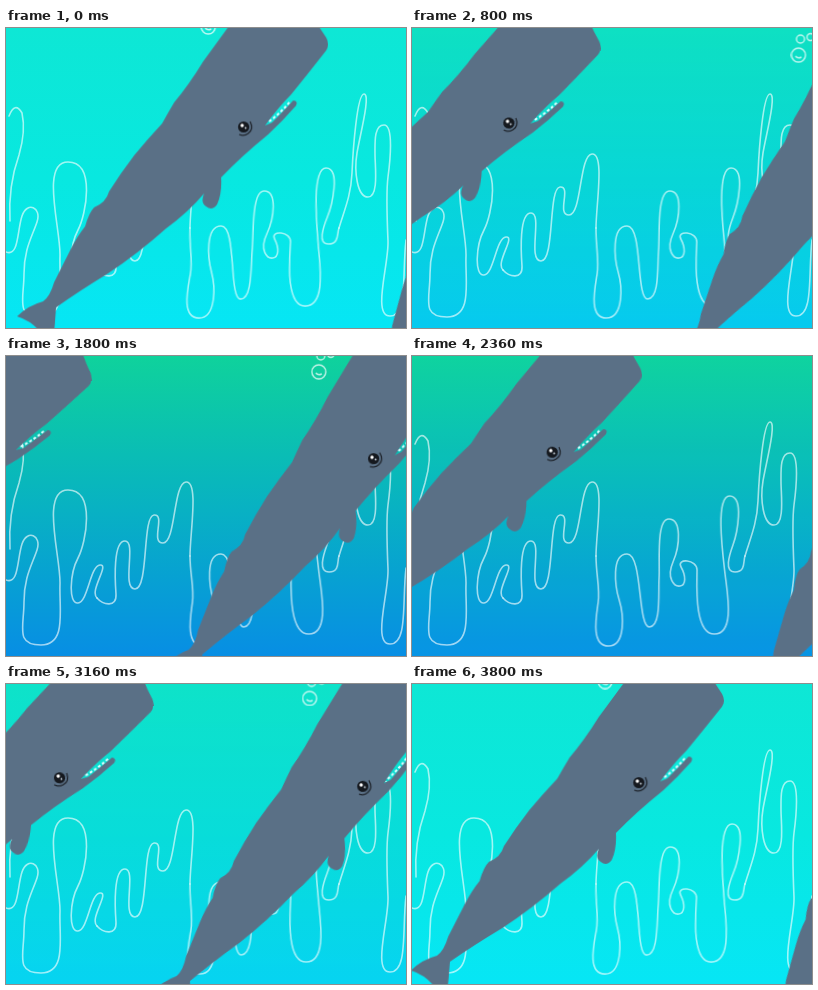
These frames come from a looping animation (400 by 300 pixels, 3840 ms). An HTML page without scripts:

```html
<!DOCTYPE html>
<html lang="en">
<head>
<meta charset="utf-8">
<title>Whales</title>
<style>
  html, body { margin: 0; width: 100%; height: 100%; overflow: hidden; }
  svg { display: block; width: 100vw; height: 100vh; }

  .dusk { animation: dusk 1920ms cubic-bezier(.58, 0, .42, 1) infinite alternate; }
  .weed { fill: none; stroke: #fff; stroke-opacity: .62; stroke-width: 1.6; stroke-linecap: round; stroke-linejoin: round; }
  .sway { transform-origin: 184px 200px; animation: sway 1920ms ease-in-out infinite alternate; }

  .whale { animation: swim 3840ms steps(96) var(--lead) infinite; }
  .bubbles { fill: none; stroke: #fff; stroke-opacity: .75; stroke-width: 1.4; animation: drift 3840ms steps(96) var(--lead) infinite; }
  .first { --lead: -2360ms; }
  .second { --lead: -1040ms; }
  .third { --lead: -3480ms; }

  @keyframes dusk { from { opacity: 0; } to { opacity: 1; } }
  @keyframes sway { from { transform: skewX(-2deg); } to { transform: skewX(.6deg); } }
  /* The eye is the pivot: it moves evenly while the body tilts upward. */
  @keyframes swim {
    from { transform: translate(-401px, 81.6px) rotate(24.3deg); }
    to { transform: translate(639px, 110.7px) rotate(-15.2deg); }
  }
  @keyframes drift {
    from { transform: translate(-341px, -84px); }
    to { transform: translate(543px, 51px); }
  }
</style>
</head>
<body>
<svg viewBox="0 0 400 300" preserveAspectRatio="none">
  <defs>
    <linearGradient id="day" x2="0" y2="1">
      <stop stop-color="#0ee7d5"/>
      <stop offset=".5" stop-color="#08e8e0"/>
      <stop offset="1" stop-color="#06e6f5"/>
    </linearGradient>
    <linearGradient id="night" x2="0" y2="1">
      <stop stop-color="#10d29c"/>
      <stop offset=".5" stop-color="#08b2c2"/>
      <stop offset="1" stop-color="#088ee4"/>
    </linearGradient>

    <g id="whale" transform="translate(-238 -99)">
      <path fill="#5a7086" d="M221 0 L197 33 Q183 56 168 74 Q162 84 156 95 Q142 110 128 127
        Q115 144 103 163 Q100 174 88 179 Q83 184 79 198 Q71 208 64 222 Q57 236 48 254 Q44 268 37 273
        Q22 277 11 288 Q24 292 33 302 Q40 312 47 313 Q49 296 50 279
        Q74 262 102 245 Q132 225 160 200 Q182 184 198 165 Q194 174 200 178 Q206 183 211 176 Q216 165 215 149
        Q235 128 262 106 Q277 92 290 77 Q292 72 287 72 Q276 84 266 94 L259 97
        Q272 79 285 66 Q302 45 320 22 Q324 16 320 9 L314 0 Q303 -22 285 -32 Q255 -42 236 -20 Z"/>
      <path fill="none" stroke="#dffcff" stroke-width="2" stroke-dasharray="2.8 2.2" d="M263 93 Q275 84 284 73"/>
      <circle cx="237.5" cy="98.5" r="5.6" fill="#15191f"/>
      <path fill="none" stroke="#20262e" stroke-width="1.3" d="M244 93 Q248 101 242 105 Q238 108 233 106"/>
      <circle cx="236" cy="97" r="1.7" fill="#fff"/>
      <circle cx="239.5" cy="99.5" r=".9" fill="#cfd8e0"/>
    </g>

    <g id="bubbles">
      <circle r="7"/>
      <path d="M-3 1 Q-1 4 3 2"/>
      <circle cx="2" cy="-16" r="4"/>
      <circle cx="12" cy="-18" r="3.5"/>
    </g>
  </defs>

  <rect width="400" height="300" fill="url(#day)"/>
  <rect class="dusk" width="400" height="300" fill="url(#night)"/>

  <g class="weed">
    <path d="M3 88 Q9 73 16 85 Q20 103 13 127 Q2 158 4 193"/>
    <path d="M0 224 C13 229 11 203 16 188 S36 179 31 194 S18 221 18 246 S9 289 35 289
      S53 254 54 228 S34 134 62 134 S80 187 72 202 S62 248 72 247 S84 210 94 209 S83 235 91 242"/>
    <path d="M91 242 C97 249 111 252 110 238 S107 185 119 185 S115 233 129 233 S136 160 148 159
      S144 187 157 187 S167 127 180 126 S184 177 184 200"/>
    <path class="sway" d="M184 200 C184 219 188 232 186 246 S178 290 196 290 S211 257 207 244
      S199 198 215 198 S225 271 237 271 S246 237 247 222 S244 163 257 163 S268 190 261 206
      S262 231 268 230 S274 220 269 211 S285 203 285 214 S281 278 302 278 S315 236 313 218
      S303 140 318 140 S325 178 321 189 S312 216 323 216 S331 205 333 200"/>
    <path d="M333 200 C338 183 345 168 346 145 S351 66 358 66 S354 107 351 125 S351 169 362 169
      S369 138 369 126 S368 97 378 97 S384 134 382 149 S381 190 382 213 S366 288 384 288 S396 246 400 212"/>
  </g>

  <use href="#bubbles" class="bubbles first"/>
  <use href="#bubbles" class="bubbles second"/>
  <use href="#bubbles" class="bubbles third"/>
  <use href="#whale" class="whale first"/>
  <use href="#whale" class="whale second"/>
  <use href="#whale" class="whale third"/>
</svg>
</body>
</html>
```
